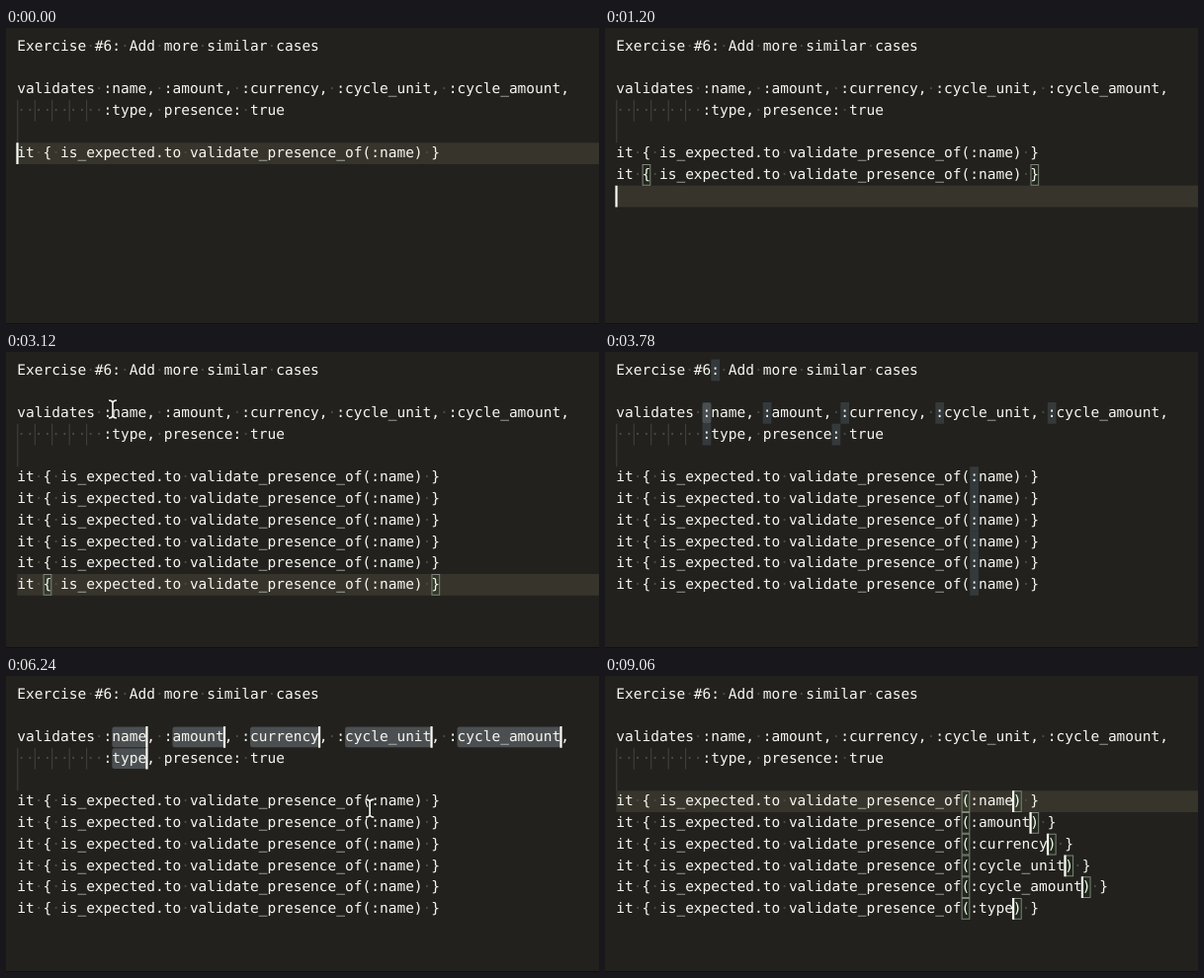
Animation of 600 by 300 pixels, one loop 9240 ms. Source, as an HTML page:

```html
<!DOCTYPE html>
<html lang="en">
<head>
<meta charset="utf-8">
<title>Multi-cursor editing</title>
<style>
  html, body { margin: 0; width: 100%; height: 100%; overflow: hidden; background: #22211d; }
  svg { display: block; width: 600px; height: 300px; }
  text {
    font: 14.5px "DejaVu Sans Mono", monospace;
    text-rendering: geometricPrecision;
    fill: #f6f6f0;
    white-space: pre;
  }
  .dots { fill: #4b4a42; }
  .line { fill: #37342c; }
  .match { fill: #343a3c; }
  .sel { fill: #4b4f51; }
  .guide { fill: #45443d; }
  .bracket { fill: #0064001a; stroke: #80847c; }
  .caret { fill: #fbfbf6; }
  .edge { fill: #14100e; }
  .mouse { fill: none; stroke: #f4f4f0; stroke-width: 1.7; }
  .mouse.rim { stroke: #1118; stroke-width: 3.2; }
</style>
</head>
<body>
<svg id="stage" viewBox="0 0 600 300"></svg>
<script>
const LOOP = 9240, TICK = 60, BLINK = 300;
const X = 11.3, Y = 7.5, W = 8.73, H = 21.75, BASE = 15.15;
const FIRST = 5, OPEN = 40, WORD = 42;
const HEAD = [
  'Exercise #6: Add more similar cases',
  '',
  'validates :name, :amount, :currency, :cycle_unit, :cycle_amount,',
  '          :type, presence: true',
  ''
];
const NAMES = ['name', 'amount', 'currency', 'cycle_unit', 'cycle_amount', 'type'];

// Where each attribute word starts in the validates call
const words = NAMES.map(name => {
  const row = name === 'type' ? 3 : 2;
  return { row, from: HEAD[row].indexOf(':' + name) + 1, size: name.length };
});
const rowOf = i => FIRST + i;
const testLine = name => `it { is_expected.to validate_presence_of(:${name}) }`;
const END = testLine('name').length;
const braces = row => [[row, 3], [row, END - 1]];

// Each step changes part of the editor state; setting carets restarts the blink
const steps = [
  [0, { copies: 1, pasted: false, line: 5, carets: [[5, 0]], sels: [], match: '', brackets: [] }],
  [300, { line: null, carets: [[5, END]], sels: [[5, 0, END]] }],
  [600, { line: 5, carets: [[5, END]], sels: [] }],
  [720, { brackets: braces(5) }],
  [1260, { brackets: [] }],
  [3300, { line: 2, carets: [[2, 11]] }],
  [3360, { brackets: [] }],
  [3480, { line: null, carets: [[2, 10]], sels: [[2, 10, 11]] }],
  [3540, { match: ':' }],
  [4800, { line: 2, carets: words.map(w => [w.row, w.from]), sels: [], match: '' }],
  [5040, {
    line: null,
    carets: words.map(w => [w.row, w.from + w.size]),
    sels: words.map(w => [w.row, w.from, w.from + w.size])
  }],
  [6540, { line: 5, carets: [[5, WORD + 2]], sels: [] }],
  [6660, { match: 'name' }],
  [7800, { pasted: true, line: 5, sels: [], carets: NAMES.map((n, i) => [rowOf(i), WORD + n.length]) }],
  [7860, { match: '', carets: NAMES.map((n, i) => [rowOf(i), WORD + n.length]) }],
  [7920, { brackets: NAMES.flatMap((n, i) => [[rowOf(i), OPEN], [rowOf(i), WORD + n.length]]) }]
];

// Enter, paste, bracket match for every new line
[[900, 1080, 1140], [1200, 1380, 1440], [1500, 1680, 1680], [1740, 1920, 1980], [2040, 2220, 2280]]
  .forEach(([enter, paste, match], i) => {
    const row = rowOf(i + 1);
    const stale = i === 1 ? {} : { brackets: [] };
    steps.push(
      [enter, { line: row, carets: [[row, 0]], ...stale }],
      [paste, { copies: i + 2, carets: [[row, END]] }],
      [match, { brackets: braces(row) }]
    );
  });

// Add the next colon to the selection
[4020, 4200, 4320, 4440, 4620].forEach((t, i) => {
  const more = words.slice(1, i + 2);
  steps.push([t, {
    carets: [[2, 10], ...more.map(w => [w.row, w.from])],
    sels: [[2, 10, 11], ...more.map(w => [w.row, w.from - 1, w.from])]
  }]);
});

// Add the next "name" to the selection
[6600, 6840, 7020, 7200, 7380, 7560].forEach((t, i) => {
  const rows = NAMES.slice(0, i + 1).map((n, k) => rowOf(k));
  steps.push([t, {
    line: null,
    carets: rows.map(r => [r, WORD + 4]),
    sels: rows.map(r => [r, WORD, WORD + 4])
  }]);
});
steps.sort((a, b) => a[0] - b[0]);

// Pointer tracks: [time, x, y], visible until `end`
const tracks = [
  { end: 3480, pts: [[2460, 330, 150], [2640, 260, 84], [2880, 160, 31], [3120, 108, 58]] },
  { end: 8580, pts: [[5940, 152, 68], [6120, 300, 112], [6300, 392, 142], [6360, 397, 130],
                     [6660, 397, 130], [7260, 498, 82], [8460, 498, 82], [8520, 519, 77]] }
];

function stateAt(t) {
  const s = {};
  for (const [at, patch] of steps) {
    if (at > t) break;
    Object.assign(s, patch);
    if (patch.carets) s.since = at;
  }
  s.lit = Math.floor((t - s.since) / BLINK) % 2 === 0;
  return s;
}

function pointerAt(t) {
  const track = tracks.find(k => t >= k.pts[0][0] && t < k.end);
  if (!track) return null;
  const { pts } = track;
  const i = pts.findIndex(p => p[0] > t);
  if (i < 0) return pts[pts.length - 1].slice(1);
  const [t0, x0, y0] = pts[i - 1], [t1, x1, y1] = pts[i];
  const u = (t - t0) / (t1 - t0), k = u * u * (3 - 2 * u);
  return [x0 + (x1 - x0) * k, y0 + (y1 - y0) * k];
}

const cx = col => X + col * W;
const cy = row => Y + row * H;
const rect = (cls, x, y, w, h, r = 0) =>
  `<rect class="${cls}" x="${x}" y="${y}" width="${w}" height="${h}" rx="${r}"/>`;
const label = (cls, row, str) =>
  `<text class="${cls}" x="${X}" y="${cy(row) + BASE}">${str.replace(/ /g, '\u00a0')}</text>`;

function matches(rows, word) {
  if (!word) return [];
  return rows.flatMap((str, row) =>
    [...str.matchAll(new RegExp(word, 'g'))].map(m => [row, m.index]));
}

function draw(t) {
  const s = stateAt(t);
  const rows = [...HEAD];
  for (let i = 0; i < s.copies; i++) rows.push(testLine(s.pasted ? NAMES[i] : 'name'));

  const out = [];
  if (s.line !== null) out.push(rect('line', X, cy(s.line), 600 - X, H));
  for (const [r, c] of matches(rows, s.match))
    out.push(rect('match', cx(c), cy(r), s.match.length * W, H));
  for (const [r, a, b] of s.sels)
    out.push(rect('sel', cx(a), cy(r) + 0.4, (b - a) * W, H - 0.8, 2.5));
  for (const [r, c] of s.brackets)
    out.push(rect('bracket', cx(c) + 0.6, cy(r) + 0.5, W - 1, H - 1));

  for (let c = 0; c < 10; c += 2)
    out.push(rect('guide', cx(c), cy(3), 1, c ? H : 2 * H));
  rows.forEach((str, r) => {
    if (!str) return;
    out.push(label('dots', r, str.replace(/./g, ch => ch === ' ' ? '·' : ' ')));
    out.push(label('code', r, str));
  });

  if (s.lit) for (const [r, c] of s.carets)
    out.push(rect('caret', cx(c) - 0.9, cy(r), 2.2, H));

  const p = pointerAt(t);
  if (p) {
    const d = 'M-4-9Q-1-9 0-7Q1-9 4-9M0-7V7M-4 9Q-1 9 0 7Q1 9 4 9';
    out.push(`<g transform="translate(${p})"><path class="mouse rim" d="${d}"/><path class="mouse" d="${d}"/></g>`);
  }
  out.push(rect('edge', 0, 299, 600, 1));
  return out.join('');
}

const stage = document.getElementById('stage');
const start = performance.now();
let shown = '';
function frame() {
  const t = (performance.now() - start) % LOOP;
  const next = draw(Math.floor(t / TICK) * TICK);
  if (next !== shown) stage.innerHTML = shown = next;
  requestAnimationFrame(frame);
}
frame();
</script>
</body>
</html>
```
